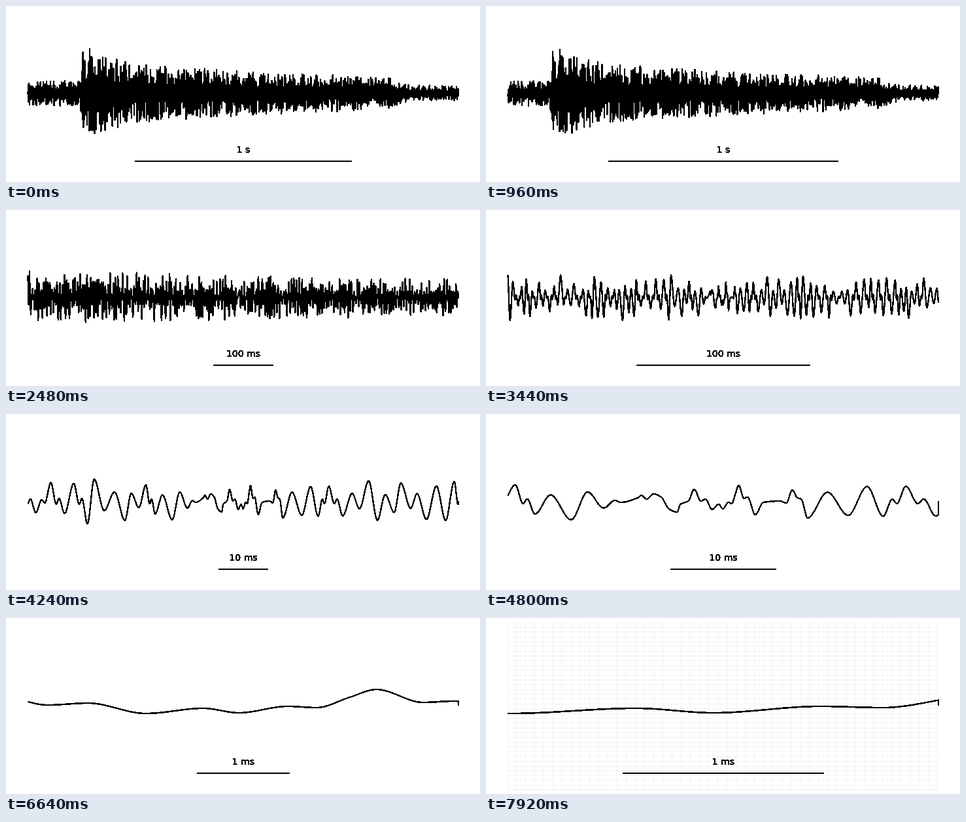
Animation, 725 px wide and 271 px high, one loop 8000 ms. Source, as an HTML page:

```html
<!DOCTYPE html>
<html lang="en">
<head>
<meta charset="utf-8">
<title>Waveform zoom</title>
<style>
  html, body { margin: 0; width: 100%; height: 100%; overflow: hidden; background: #fff; }
  svg { display: block; width: 725px; height: 271px; }
  text { font: 14px "DejaVu Sans", sans-serif; text-anchor: middle; stroke: #000; stroke-width: 0.6; }
  path { fill: none; stroke: #000; }
</style>
</head>
<body>
<svg viewBox="0 0 725 271">
  <filter id="crisp" filterUnits="userSpaceOnUse" x="0" y="0" width="725" height="271">
    <feComponentTransfer><feFuncA type="discrete" tableValues="0 1"/></feComponentTransfer>
  </filter>
  <path id="grid" shape-rendering="crispEdges"/>
  <g filter="url(#crisp)">
    <path id="wave" stroke-width="2.4" stroke-linejoin="round"/>
    <path id="bar" stroke-width="2"/>
    <text id="label" x="363" y="226"></text>
  </g>
</svg>
<script>
const LEFT = 33, RIGHT = 692, CENTER = 363, BASE = 134.5;
const LOOP = 8000, HOLD = 560, STEP = 80;
const $ = id => document.getElementById(id);

// Pixels per millisecond: exponential zoom with a cosine ease over 100 steps.
const scaleAt = step => 0.331 * Math.exp(6.92 * (1 - Math.cos(Math.PI * step / 100)) / 2);

// The middle 16 ms, as x, y key points at 41.6 px per ms.
const middle = [
  [33, 128], [41, 125], [63, 131], [90, 123], [120, 128], [150, 146], [182, 151], [195, 139],
  [226, 134], [249, 116], [275, 134], [293, 131], [319, 147], [345, 139], [361, 146], [383, 136],
  [396, 138], [411, 122], [423, 110], [444, 130], [458, 128], [488, 155], [520, 136], [585, 134],
  [610, 137], [633, 117], [653, 129], [668, 131], [693, 160]
];
// Knots are [time in ms from the centre, y].
const knots = middle.map(([x, y]) => [(x - CENTER) / 41.6, y]);

let seed = 7;
function random() {
  seed = (seed * 16807) % 2147483647;
  return seed / 2147483647;
}

// A quiet lead-in, a sharp attack, a two-part decay and a quiet tail.
function loudness(t) {
  const s = (t + 731) / 1000;
  if (s < -0.022) return 18;
  const attack = Math.min(1, 0.6 + (s + 0.022) * 20);
  const tail = Math.min(1, Math.max(0.55, 1 - (s - 1.4) * 5));
  return attack * tail * (24 * Math.exp(-s / 0.1) + 46 * Math.exp(-s / 2));
}

// Random swings up and down, some with a ripple on the way.
let sign = 1;
for (let t = -1003; t < 1003;) {
  const size = loudness(t) * (0.3 + 0.8 * random() ** 1.5);
  const ripple = random() < 0.3;
  const gap = (1.2 + 0.9 * random()) * (ripple ? 1.5 : 1);
  if (Math.abs(t + gap / 2) > 9.3) {
    knots.push([t, BASE + sign * size]);
    if (ripple) {
      knots.push([t + gap * 0.4, BASE - sign * size * 0.15]);
      knots.push([t + gap * 0.6, BASE + sign * size * 0.15]);
    }
  }
  sign = -sign;
  t += gap;
}
knots.sort((a, b) => a[0] - b[0]);

// Monotone cubic tangents keep every knot a true extreme.
const slope = i => (knots[i + 1][1] - knots[i][1]) / (knots[i + 1][0] - knots[i][0]);
const tangents = knots.map((_, i) => {
  if (i === 0 || i === knots.length - 1) return 0;
  const a = slope(i - 1), b = slope(i);
  return a * b <= 0 ? 0 : 2 * a * b / (a + b);
});

function heightAt(t) {
  let lo = 0, hi = knots.length - 1;
  while (hi - lo > 1) {
    const mid = (lo + hi) >> 1;
    if (knots[mid][0] > t) hi = mid; else lo = mid;
  }
  const [t0, y0] = knots[lo], [t1, y1] = knots[hi];
  const d = t1 - t0, u = (t - t0) / d, v = 1 - u;
  return y0 * v * v * (1 + 2 * u) + y1 * u * u * (3 - 2 * u)
    + d * u * v * (tangents[lo] * v - tangents[hi] * u);
}

function wavePath(k) {
  const dx = Math.min(0.5, 0.25 * k);
  const points = [];
  for (let x = LEFT + 0.5; x <= RIGHT; x += dx) {
    points.push(x.toFixed(2) + " " + heightAt((x - CENTER) / k).toFixed(1));
  }
  return "M" + points.join("L") + `L${RIGHT} ${BASE}`;
}

// One column per audio sample at 22.05 kHz.
function gridPath(k) {
  const cell = k / 22.05, columns = Math.floor(660 / cell);
  const right = LEFT + columns * cell;
  let d = "";
  for (let i = 0; i <= columns; i++) d += `M${LEFT + i * cell} 7V265`;
  for (let y = 7; y < 266; y += 7.37) d += `M${LEFT} ${y}H${right}`;
  return d;
}

function draw(step) {
  const k = scaleAt(step);
  const unit = 10 ** Math.floor(Math.log10(660 / k));
  const half = unit * k / 2;
  $("wave").setAttribute("d", wavePath(k));
  $("bar").setAttribute("d", `M${CENTER - half} 239H${CENTER + half}`);
  $("label").textContent = unit >= 1000 ? unit / 1000 + " s" : unit + " ms";
  const gridOpacity = Math.max(0, (step - 85) / 170);
  $("grid").setAttribute("d", gridOpacity ? gridPath(k) : "");
  $("grid").setAttribute("stroke-opacity", gridOpacity);
}

let shown = -1;
function tick() {
  const time = performance.now() % LOOP;
  const step = time < HOLD ? 0 : 1 + Math.floor((time - HOLD) / STEP);
  if (step !== shown) draw(shown = step);
  requestAnimationFrame(tick);
}
tick();
</script>
</body>
</html>
```
